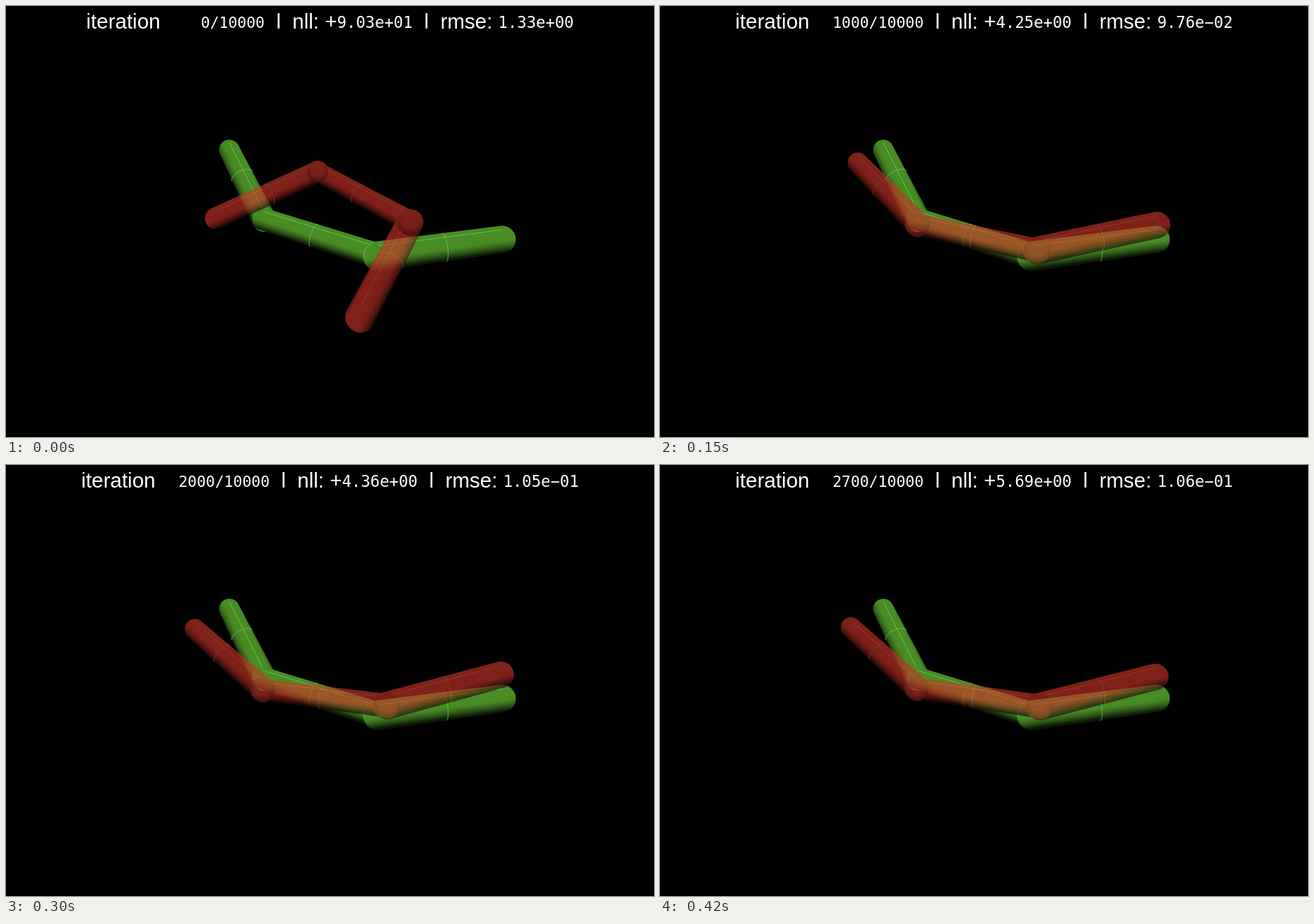
An HTML page with a canvas for the animation above (1450 ms loop, 917 by 611 pixels).

```html
<!DOCTYPE html>
<html>
<head>
<meta charset="utf-8">
<style>
html, body { margin: 0; height: 100%; overflow: hidden; background: #000; }
canvas { display: block; }
</style>
</head>
<body>
<canvas id="stage" width="917" height="611"></canvas>
<script>
const W = 917, H = 611, LOOP = 1450, STEP = 30, LAST = 14;
const stage = document.getElementById('stage').getContext('2d');

const green = { rgb: [72, 140, 36], line: 'rgba(105,215,85,.75)' };
const red = { rgb: [205, 54, 40], line: 'rgba(235,130,115,.5)', alpha: 0.62 };

// joints of each chain as x, y pairs
const truth = chain([316, 204, 364, 302, 527, 355, 702, 331], [14.5, 18, 21.5, 19.5]);
const guess = [297, 301, 441, 235, 572, 307, 502, 441];
const jump = [278, 219, 366, 305, 534, 347, 709, 319];
const near = [290, 214, 365, 303, 530, 351, 706, 321];
const far = [267, 233, 363, 319, 539, 341, 700, 297];

// readouts at a few steps
const marks = [0, 1, 3, 5, 8, 11, 14];
const nll = [90.3, 11.5, 5.24, 4.25, 6.88, 3.1, 5.69];
const rmse = [1.33, 0.113, 0.0915, 0.0976, 0.103, 0.106, 0.106];

const mix = (a, b, u) => a + (b - a) * u;
const mixPose = (a, b, u) => a.map((v, i) => mix(v, b[i], u));

function chain(xy, radii) {
  return radii.map((r, i) => ({ x: xy[2 * i], y: xy[2 * i + 1], r }));
}

function readout(values, step) {
  const i = Math.max(1, marks.findIndex(m => m >= step));
  return mix(values[i - 1], values[i], (step - marks[i - 1]) / (marks[i] - marks[i - 1]));
}

// one jump, a short approach, then a slow drift that turns back near the end
function fitted(step) {
  if (step === 0) return chain(guess, [15.5, 15.5, 19, 22]);
  const pose = step < 3
    ? mixPose(jump, near, (step - 1) / 2)
    : mixPose(near, far, 1 - ((11 - step) / 8) ** 2);
  return chain(pose, [14.5, 18, 19.5, 18.8]);
}

function shade(rgb, b) {
  b = Math.max(0.1, Math.min(1, b));
  return `rgb(${rgb.map(c => Math.round(c * b))})`;
}

function newLayer() {
  const c = document.createElement('canvas');
  c.width = W;
  c.height = H;
  return c.getContext('2d');
}

function capsule(g, p, q, look) {
  const a = Math.atan2(q.y - p.y, q.x - p.x);
  // side vector pointing down the screen
  const flip = Math.cos(a) < 0 ? -1 : 1;
  const sx = -Math.sin(a) * flip, sy = Math.cos(a) * flip;
  const t = p.r / (p.r + q.r);
  const mx = mix(p.x, q.x, t), my = mix(p.y, q.y, t);
  const r = (p.r + q.r) / 2;

  const fill = g.createLinearGradient(mx - sx * r, my - sy * r, mx + sx * r, my + sy * r);
  for (let i = 0; i <= 12; i++) {
    const s = i / 6 - 1;
    const b = 0.45 + 0.65 * Math.sqrt(1 - s * s) - 0.7 * sy * s;
    fill.addColorStop(i / 12, shade(look.rgb, b));
  }
  g.fillStyle = fill;
  g.beginPath();
  g.arc(p.x, p.y, p.r, a + Math.PI / 2, a - Math.PI / 2);
  g.arc(q.x, q.y, q.r, a - Math.PI / 2, a + Math.PI / 2);
  g.fill();

  // seam along the upper side and ring around the middle
  g.strokeStyle = look.line;
  g.lineWidth = 1;
  g.beginPath();
  g.moveTo(p.x, p.y - 0.7 * p.r);
  g.lineTo(q.x, q.y - 0.7 * q.r);
  g.stroke();
  const up = q.y < p.y ? a : a + Math.PI;
  const tilt = Math.abs(Math.sin(a));
  const shift = 0.5 * tilt * r;
  g.beginPath();
  g.ellipse(mx + Math.cos(up) * shift, my + Math.sin(up) * shift,
    r * (0.2 + 0.3 * tilt), r, up, -Math.PI / 2, Math.PI / 2);
  g.stroke();
}

function ball(g, p, look) {
  const fill = g.createRadialGradient(p.x, p.y - p.r * 0.35, 0, p.x, p.y - p.r * 0.35, p.r * 1.35);
  fill.addColorStop(0, shade(look.rgb, 1));
  fill.addColorStop(0.55, shade(look.rgb, 0.94));
  fill.addColorStop(1, shade(look.rgb, 0.5));
  g.fillStyle = fill;
  g.beginPath();
  g.arc(p.x, p.y, p.r * 0.95, 0, 7);
  g.fill();
}

function drawChain(g, pts, look) {
  const slim = p => ({ ...p, r: p.r * 0.86 });
  capsule(g, pts[0], pts[1], look);
  capsule(g, slim(pts[1]), slim(pts[2]), look);
  capsule(g, pts[2], pts[3], look);
}

const back = newLayer();
drawChain(back, truth, green);
back.beginPath();
back.arc(truth[2].x, truth[2].y, truth[2].r - 0.5, Math.PI * 0.95, Math.PI * 1.4);
back.stroke();
const front = newLayer();

function sci(v) {
  const [m, e] = v.toExponential(2).split('e');
  return m + 'e' + e[0].replace('-', '\u2212') + '0' + e[1];
}

function drawTitle(step) {
  const sans = '29.5px "Liberation Sans", Arial, sans-serif';
  const mono = px => px + 'px "DejaVu Sans Mono", monospace';
  const count = String(Math.min(step * 200, 2700));
  const runs = [
    [sans, 'iteration   ' + ' '.repeat(5 - count.length)],
    [mono(21.4), count + '/10000'],
    [sans, '  l  nll: +'],
    [mono(22.2), sci(readout(nll, step))],
    [sans, '  l  rmse: '],
    [mono(22.2), sci(readout(rmse, step))]
  ].map(([font, text]) => {
    stage.font = font;
    return { font, text, w: stage.measureText(text).width };
  });
  let x = (W - runs.reduce((sum, run) => sum + run.w, 0)) / 2;
  stage.fillStyle = '#fff';
  for (const { font, text, w } of runs) {
    stage.font = font;
    stage.fillText(text, x, font === sans ? 32 : 31);
    x += w;
  }
}

function draw(step) {
  const fit = fitted(step);
  front.clearRect(0, 0, W, H);
  drawChain(front, fit, red);
  ball(front, fit[1], red);
  ball(front, fit[2], red);

  stage.fillStyle = '#000';
  stage.fillRect(0, 0, W, H);
  stage.drawImage(back.canvas, 0, 0);
  stage.globalAlpha = red.alpha;
  stage.drawImage(front.canvas, 0, 0);
  stage.globalAlpha = 1;
  drawTitle(step);
}

const start = performance.now();
function tick() {
  const t = (performance.now() - start) % LOOP;
  draw(Math.min(LAST, Math.floor(t / STEP)));
  requestAnimationFrame(tick);
}
tick();
</script>
</body>
</html>
```
